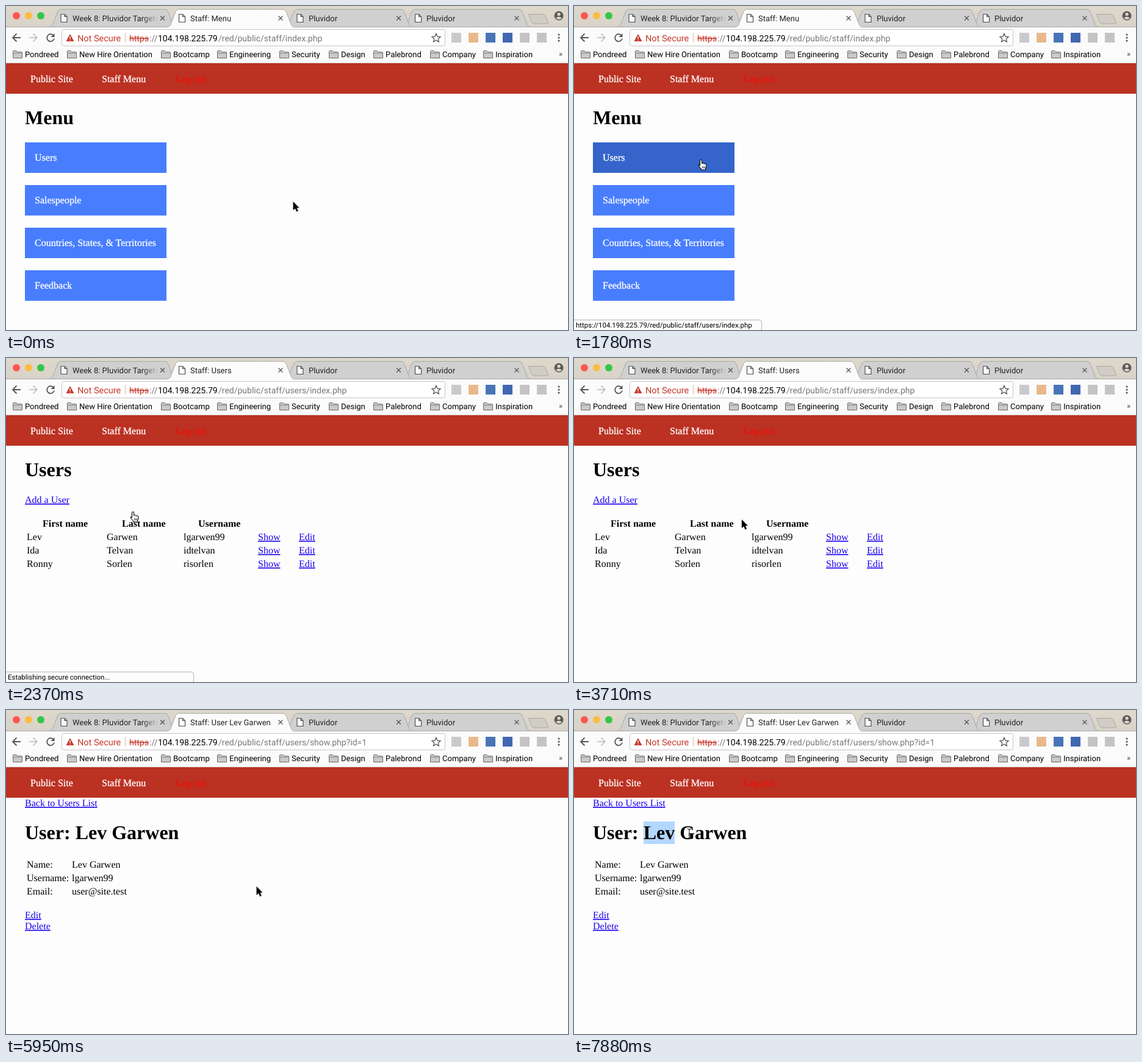
Animation of 921 by 532 pixels, one loop 8000 ms. Source, as an HTML page:

```html
<!DOCTYPE html>
<html lang="en">
<head>
<meta charset="utf-8">
<title>Staff area</title>
<style>
html, body { margin: 0; width: 100%; height: 100%; overflow: hidden; background: #fdfdfd; }
svg { display: block; width: 921px; height: 532px; }
text { white-space: pre; text-rendering: geometricPrecision; }
.ui { font-family: Roboto, "Open Sans", sans-serif; font-size: 13px; }
.url { font-size: 14px; }
.warn { font-size: 14.5px; }
.struck { text-decoration: line-through; }
.tip { font-size: 11.45px; }
.doc { font-family: "Liberation Serif", "Times New Roman", serif; font-size: 16px; }
.b { font-weight: 700; }
.h { font-size: 32px; font-weight: 700; }
.w { fill: #fff; stroke: #fff; stroke-width: .3px; }
.link { fill: #1a00ee; text-decoration: underline 1px; text-underline-offset: 1px; }
.cut { clip-path: url(#clip); }
</style>
</head>
<body>
<svg id="stage" viewBox="0 0 921 532" xmlns="http://www.w3.org/2000/svg"></svg>
<script>
const LOOP = 8000;
const stage = document.getElementById('stage');

const text = (x, y, s, cls, fill = '') =>
  `<text x="${x}" y="${y}" class="${cls}"${fill && ` fill="${fill}"`}>${s}</text>`;
const ui = (x, y, s, fill = '#000', more = '') => text(x, y, s, 'ui ' + more, fill);
const doc = (x, y, s, more = '') => text(x, y, s, 'doc ' + more);
const rect = (x, y, w, h, fill, more = '') =>
  `<rect x="${x}" y="${y}" width="${w}" height="${h}" fill="${fill}" ${more}/>`;
const dot = (x, y, r, fill) => `<circle cx="${x}" cy="${y}" r="${r}" fill="${fill}"/>`;
const path = (d, fill, stroke = 'none', width = 1, more = '') =>
  `<path d="${d}" fill="${fill}" stroke="${stroke}" stroke-width="${width}" ${more}/>`;
const group = (id, body) => `<g id="${id}">${body}</g>`;

// Browser chrome
const tab = (x, fill) => path(
  `M${x} 34.5 C${x + 3} 34 ${x + 4} 32 ${x + 5} 30 L${x + 13} 9 Q${x + 14.5} 5.5 ${x + 18} 5.5
   H${x + 189} Q${x + 192.5} 5.5 ${x + 194} 9 L${x + 202} 30 C${x + 203} 32 ${x + 204} 34 ${x + 207} 34.5`,
  fill, '#a9a8a5');
const tabParts = x =>
  path(`M${x + 18.5} 13.5 h6 l4 4 v9 h-10 z M${x + 24.5} 13.5 v4 h4`, '#fdfdfd', '#505050', 1.2) +
  path(`M${x + 181.5} 16.5 l7 7 m0 -7 l-7 7`, 'none', '#555', 1.3);
const folder = x =>
  path(`M${x + .5} 85.5 v-11 q0 -1 1 -1 h4.5 l1.5 2 h7 q1 0 1 1 v9 z`, '#c9c9c9', '#6b6b6b') +
  path(`M${x + 1} 77.5 h14`, 'none', '#8a8a8a');

const tabX = [71.5, 265, 458.5, 652];
const folders = [
  [11, 'Pondreed'], [100, 'New Hire Orientation'], [254, 'Bootcamp'], [346, 'Engineering'],
  [448, 'Security'], [529, 'Design'], [602, 'Palebrond'], [695, 'Company'], [782, 'Inspiration']
];
const badges = ['#c9c9c9', '#e9b98c', '#4a74b8', '#4267b2', '#c4c4c4', '#c4c4c4'];

const chrome =
  rect(0, 0, 921, 35, 'url(#strip)') +
  dot(17, 16, 6, '#fc5753') + dot(37, 16, 6, '#fdbc40') + dot(57, 16, 6, '#33c748') +
  tab(tabX[3], '#d0d0d0') + tab(tabX[2], '#d0d0d0') + tab(tabX[0], '#d0d0d0') +
  path('M0 34.5 H921', 'none', '#a9a8a5') +
  tab(tabX[1], '#fbfbfb') + rect(266, 34, 205, 2, '#fbfbfb') +
  rect(0, 35, 921, 59, '#fbfbfb') +
  tabX.map(tabParts).join('') +
  ui(109, 24.5, 'Week 8: Pluvidor Targets', '#222', 'cut') + rect(224, 9, 25, 20, 'url(#fade)') +
  ui(496, 24.5, 'Pluvidor', '#222') + ui(689, 24.5, 'Pluvidor', '#222') +
  path('M857 13.5 h23 q2 0 3 2 l5 11 q1 2.5 -1 2.5 h-21 q-2.5 0 -3.5 -2 l-6 -11 q-1 -2.5 .5 -2.5 z', '#d0cdc6', '#aaa7a1') +
  dot(906, 16, 7.5, '#5b5b5b') + dot(906, 13.5, 2.6, '#dcd6ca') + path('M901 20 q5 -5 10 0 q-5 4 -10 0', '#dcd6ca') +
  path('M24 52 H11.5 M17.5 45.5 L11 52 L17.5 58.5', 'none', '#555', 1.8) +
  path('M38 52 H50.5 M44.5 45.5 L51 52 L44.5 58.5', 'none', '#c9c9c9', 1.8) +
  path('M77.5 48 A6 6 0 1 0 79 53.5', 'none', '#555', 1.8) + path('M79.5 45 v6 h-6 z', '#555') +
  rect(91.5, 38.5, 628, 27, '#fff', 'rx="3" stroke="#c6c6c6"') +
  path('M105 46 L111.5 58 H98.5 Z', '#c5392a') + rect(104.3, 50, 1.4, 4, '#fff') + rect(104.3, 55, 1.4, 1.4, '#fff') +
  ui(117, 57.5, 'Not Secure', '#c5392a', 'warn') +
  rect(195, 44, 1, 16, '#d5b5b0') +
  ui(202, 57.5, 'https', '#c5392a', 'url struck') +
  ui(235, 57.5, '://', '#777', 'url') + ui(249, 57.5, '104.198.225.79', '#000', 'url') +
  path('M705 45.5 l2 4.6 5 .5 -3.8 3.3 1.1 4.9 -4.3 -2.6 -4.3 2.6 1.1 -4.9 -3.8 -3.3 5 -.5 z', 'none', '#555', 1.3) +
  badges.map((c, i) => rect(730 + 28 * i, 44, 16, 16, c)).join('') +
  [47, 52, 57].map(y => dot(906, y, 1.6, '#555')).join('') +
  folders.map(([x, s]) => folder(x) + ui(x + 20, 84, s)).join('') +
  ui(906, 83, '»', '#444') +
  rect(0, 93, 921, 1, '#d6d0cf') +
  rect(0, 94, 921, 50, '#bb3122') +
  doc(40, 125, 'Public Site', 'w') + doc(157, 125, 'Staff Menu', 'w') +
  text(278, 125, 'Log out', 'doc', '#ff0500');

// Web pages
const head = (title, url) => ui(302, 24.5, title, '#222') + ui(348, 57.5, '/red/public/staff/' + url, '#777', 'url');
const entries = ['Users', 'Salespeople', 'Countries, States, &amp; Territories', 'Feedback'];
const people = [
  ['Lev', 'Garwen', 'lgarwen99'], ['Ida', 'Telvan', 'idtelvan'], ['Ronny', 'Sorlen', 'risorlen']
];

const menuPage = head('Staff: Menu', 'index.php') + doc(31, 194, 'Menu', 'h') +
  entries.map((s, i) =>
    rect(31, 224 + 70 * i, 232, 50, '#487dfd', i ? '' : 'id="item"') + doc(47, 254 + 70 * i, s, 'w')).join('');

const listPage = head('Staff: Users', 'users/index.php') + doc(31, 194, 'Users', 'h') +
  doc(31, 238, 'Add a User', 'link') +
  doc(60, 277, 'First name', 'b') + doc(190, 277, 'Last name', 'b') + doc(315, 277, 'Username', 'b') +
  people.map(([first, last, login], i) => {
    const y = 299 + 22 * i;
    return doc(34, y, first) + doc(165, y, last) + doc(291, y, login) +
      doc(413, y, 'Show', 'link') + doc(480, y, 'Edit', 'link');
  }).join('');

const userPage = head('Staff: User Lev Garwen', 'users/show.php?id=1') +
  doc(31, 158, 'Back to Users List', 'link') +
  rect(114, 183, 51, 37, '#b3d7ff', 'id="mark"') +
  doc(31, 212, 'User: Lev Garwen', 'h') +
  [['Name:', 'Lev Garwen'], ['Username:', 'lgarwen99'], ['Email:', 'user@site.test']]
    .map(([k, v], i) => doc(34, 259 + 22 * i, k) + doc(108, 259 + 22 * i, v)).join('') +
  doc(31, 342, 'Edit', 'link') + doc(31, 360, 'Delete', 'link');

// Status bubble
const site = 'https://104.198.225.79/red/public/staff/users/';
const tip = (id, s) => group(id, ui(3, 528, s, '#000', 'tip'));
const bubble =
  path('M-1 515.5 H304 Q307.5 515.5 307.5 519 V533 H-1 Z', '#fdfdfd', '#b0b0b0') +
  tip('tipList', site + 'index.php') +
  tip('tipShow', site + 'show.php...') +
  tip('tipWait', 'Establishing secure connection...');

// Pointers: the arrow and the hand hang from their tip, the beam from its middle
const pointers =
  group('arrow', path('M0 0 V14.5 L3.4 11.4 L5.7 16.7 L8.3 15.6 L6 10.5 H10.2 Z', '#000', '#fff', 1.2, 'paint-order="stroke"')) +
  group('hand', path(
    'M-1.5 9.5 V1.5 Q-1.5 0 0 0 Q1.5 0 1.5 1.5 V6 Q3 4.8 4.2 6.3 Q5.8 5.3 6.7 7 Q9 6.5 9 8.7 ' +
    'V11.5 L7.5 14.5 V16.5 H.5 V15 L-2.6 11.5 Q-4.5 9 -3.3 8.3 Q-2.4 8 -1.5 9.5 Z',
    '#fff', '#000', 1.1, 'stroke-linejoin="round"') +
    path('M2.5 10.5 v3.5 M4.5 10.5 v3.5 M6.5 10.5 v3.5', 'none', '#000', .8)) +
  group('beam', path('M-3.5 -8 Q-.5 -8 0 -6 Q.5 -8 3.5 -8 M0 -6.5 V6.5 M-3.5 8 Q-.5 8 0 6 Q.5 8 3.5 8 M-1.5 3 H1.5',
    'none', '#222', 1.1));

stage.innerHTML = `<defs>
  <linearGradient id="strip" x2="0" y2="1"><stop stop-color="#dfd9cc"/><stop offset="1" stop-color="#d8d2c8"/></linearGradient>
  <linearGradient id="fade"><stop stop-color="#d0d0d0" stop-opacity="0"/><stop offset="1" stop-color="#d0d0d0"/></linearGradient>
  <clipPath id="clip"><rect x="109" y="8" width="139" height="24"/></clipPath></defs>` +
  rect(0, 0, 921, 532, '#fdfdfd') + chrome + group('menu', menuPage) + group('list', listPage) +
  group('user', userPage) + group('bubble', bubble) + group('pointer', pointers);

// Each step is [time, value], held until the next one
function play(id, prop, steps) {
  const frames = steps.map(([t, v]) => ({ offset: t / LOOP, [prop]: v, easing: 'step-end' }));
  frames.push({ offset: 1, [prop]: steps[steps.length - 1][1] });
  document.getElementById(id).animate(frames, { duration: LOOP, iterations: Infinity });
}
function show(id, ...spans) {
  const steps = spans[0][0] ? [[0, 0]] : [];
  for (const [from, to] of spans) {
    steps.push([from, 1]);
    if (to < LOOP) steps.push([to, 0]);
  }
  play(id, 'opacity', steps);
}

show('menu', [0, 2230]);
show('list', [2230, 5350]);
show('user', [5350, LOOP]);
show('bubble', [740, 2670], [4600, 5650]);
show('tipList', [740, 1930]);
show('tipWait', [1930, 2670], [5200, 5650]);
show('tipShow', [4600, 5200]);
show('arrow', [0, 590], [3410, 4600], [5950, 6240]);
show('hand', [590, 3410], [4600, 5950]);
show('beam', [6240, LOOP]);
show('mark', [7730, LOOP]);
play('mark', 'width', [[0, '25px'], [7880, '51px']]);
play('item', 'fill', [[0, '#487dfd'], [590, '#3f70e0'], [740, '#3565ca']]);

const ease = k => k * k * (3 - 2 * k);
const glide = Array.from({ length: 8 }, (_, i) => {
  const k = ease((i + 1) / 8);
  return [3410 + Math.round(148.6 * i), 208 + 211 * k, 252 + 41 * k];
});
const moves = [
  [0, 470.5, 321], [150, 440, 308], [300, 372, 284], [440, 304, 268], [590, 241, 262.5],
  [740, 224, 257], [890, 212, 253], [1030, 208, 252.5],
  ...glide, [4600, 424, 293], [4750, 425, 293.5],
  [5950, 410.5, 289.5], [6100, 248, 238], [6240, 187.5, 219.5],
  [6540, 182, 216], [6690, 160, 206], [6840, 137, 201], [6980, 121, 199], [7130, 115.5, 198.5],
  [7730, 145, 200], [7880, 189, 203]
];
play('pointer', 'transform', moves.map(([t, x, y]) => [t, `translate(${x}px, ${y}px)`]));
</script>
</body>
</html>
```
